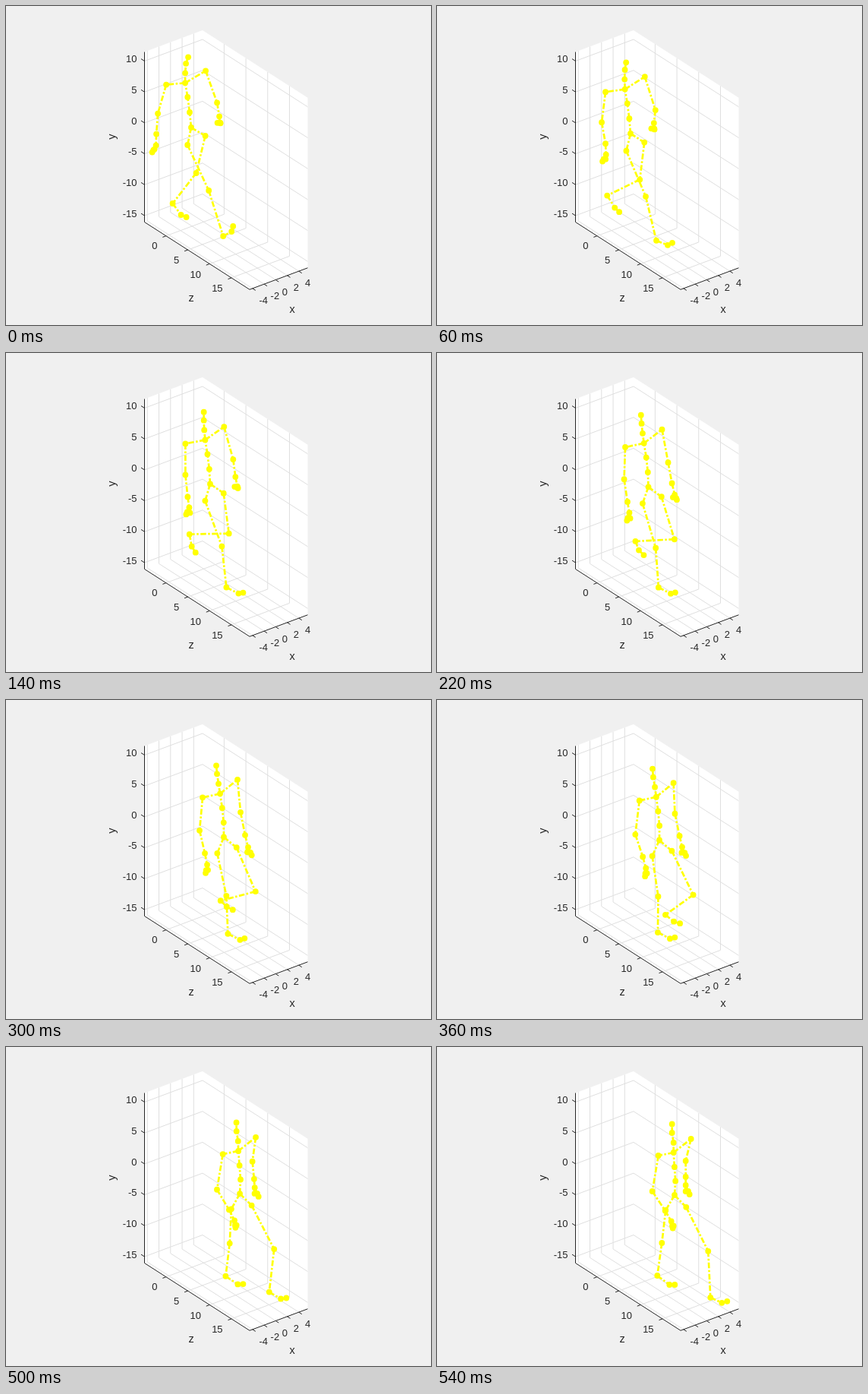
An HTML page that plays this animation: 560 px wide and 420 px high, repeating every 0.56 s.

```html
<!DOCTYPE html>
<html lang="en">
<head>
<meta charset="utf-8">
<title>Walking skeleton</title>
<style>
  html, body { margin: 0; width: 100%; height: 100%; overflow: hidden; background: #f0f0f0; }
  svg { display: block; }
  text { font: 13px "Liberation Sans", Arial, sans-serif; fill: #262626; }
  .name { font-size: 14.5px; text-anchor: middle; }
  .grid { stroke: #dfdfdf; fill: none; }
  .axis { stroke: #262626; fill: none; }
  .bone { stroke: #ff0; stroke-width: 2.7; stroke-dasharray: 7.5 2.5 2.5 2.5; }
  .joint { fill: #ff0; }
</style>
</head>
<body>
<svg id="stage" width="560" height="420" viewBox="0 0 560 420"></svg>
<script>
const stage = document.getElementById('stage');

function add(tag, attrs, text) {
  const el = document.createElementNS('http://www.w3.org/2000/svg', tag);
  for (const key in attrs) el.setAttribute(key, attrs[key]);
  if (text !== undefined) el.textContent = text;
  return stage.appendChild(el);
}

// Oblique box: u runs along x, v along z, h along y (all in pixels)
const U = 76.5, V = 138.5, H = 224;
const project = (u, v, h) => [182.5 + u + v, 284.5 - u * 0.3725 + v * 0.641 - h];
const path = (cls, ...points) =>
  add('polyline', { class: cls, points: points.map(p => project(...p)).join(' ') });
const label = (x, y, text, anchor) =>
  add('text', { x, y: y + 4.7, 'text-anchor': anchor }, text);

const outline = [[0, 0, 0], [0, 0, H], [U, 0, H], [U, V, H], [U, V, 0], [0, V, 0]];
path('face', ...outline).setAttribute('fill', '#fff');

for (let i = 0; i < 5; i++) {
  const u = 3.8 + i * 15.25;
  path('grid', [u, 0, H], [u, 0, 0], [u, V, 0]);
  path('axis', [u, V, 0], [u, V + 4, 0]);
  label(333.5 + i * 15.1, 387.3 - i * 5.7, 2 * i - 4, 'start');
}
for (let i = 0; i < 4; i++) {
  const v = 28.4 + i * 28.7;
  path('grid', [0, v, 0], [U, v, 0], [U, v, H]);
  path('axis', [0, v, 0], [-4.5, v, 0]);
  label(199.5 + i * 28.7, 315.5 + i * 18.7, 5 * i, 'end');
}
for (let i = 0; i < 6; i++) {
  const h = 8.5 + i * 40.7;
  path('grid', [0, 0, h], [U, 0, h], [U, V, h]);
  path('axis', [0, 0, h], [-0, -4.5, h]);
  label(172.5, 273 - i * 40.7, 5 * i - 15, 'end');
}
path('axis', [0, 0, H], [0, 0, 0], [0, V, 0], [U, V, 0]);

add('text', { class: 'name', x: 377, y: 404 }, 'x');
add('text', { class: 'name', x: 244, y: 389 }, 'z');
add('text', { class: 'name', transform: 'translate(144 172) rotate(-90)' }, 'y');

// Key times in steps of 20 ms, chosen by the number of poses given
const STEP = 20, STEPS = 28;
const keyTimes = { 2: [0, 27], 3: [0, 15, 27], 4: [0, 7, 15, 27], 6: [0, 3, 7, 15, 22, 27] };

// Smooth curve through the keys (cubic Hermite)
function curve(times, values, t) {
  const last = times.length - 1;
  const slope = k => {
    const a = Math.max(k - 1, 0), b = Math.min(k + 1, last);
    return (values[b] - values[a]) / (times[b] - times[a]);
  };
  let k = 0;
  while (k < last - 1 && t > times[k + 1]) k++;
  const span = times[k + 1] - times[k], s = (t - times[k]) / span, r = 1 - s;
  return values[k] * r * r * (1 + 2 * s) + values[k + 1] * s * s * (3 - 2 * s)
    + span * s * r * (slope(k) * r - slope(k + 1) * s);
}

const joints = [];

// Each joint moves relative to its parent; keys are x, y pairs
function joint(parent, ...keys) {
  const node = {
    parent,
    xs: keys.filter((_, i) => i % 2 === 0),
    ys: keys.filter((_, i) => i % 2 === 1),
    line: parent && add('line', { class: 'bone' }),
    dot: add('circle', { class: 'joint', r: 3.9 })
  };
  joints.push(node);
  return node;
}

function hand(wrist, fingers, thumb) {
  const palm = joint(wrist, ...fingers.map(n => n * 0.66));
  joint(palm, ...fingers.map(n => n * 0.34));
  joint(wrist, ...thumb);
}

const root = joint(null, 244, 160, 255, 168, 269, 172.4, 287, 180.5, 301, 190, 313, 195);

const waist = joint(root, -2, -20, 1.2, -18.5);
const chest = joint(waist, -2.7, -20, -1.3, -18.5);
const neck = joint(chest, -3.2, -18.7, -2.8, -18.8, -1.2, -19);
const throat = joint(neck, 0, -13, -2, -13, 0, -13);
const face = joint(throat, 1, -12.5, -2, -13, -2, -13);
joint(face, 3, -8.5, 0, -11, -1, -11, 0, -11.5);

const shoulderL = joint(neck, -25, 2.3, -26, 5, -23, 5, -20, 4);
const elbowL = joint(shoulderL, -11, 38, -5, 40, 0, 41, -4, 43.5, -7, 46, -8, 47);
const forearmL = joint(elbowL, -2, 27, 5, 28, 3, 29, 7, 30, 14, 28, 17, 25.5);
const wristL = joint(forearmL, -0.5, 15, 2, 14, 3, 15, 8, 14);
hand(wristL, [-5, 9, -4, 9, -2, 11, 2, 9], [-2, 5, 1, 7, 1, 7, 3, 6]);

const shoulderR = joint(neck, 27, -16, 23, -18.5, 23, -18);
const elbowR = joint(shoulderR, 15, 42, 14, 44, 12, 43, 4, 43, -1, 36, -7, 29);
const forearmR = joint(elbowR, 3, 18, -2, 17, 3, 23, 6, 30, 5, 26, 0, 21);
const wristR = joint(forearmR, 0.5, 8, 0, 7, 2.5, 12.5, 4, 16, 2, 12, 0, 11);
hand(wristR, [1, 1, 0.8, 2.5, 4.7, 10.5, 5, 12], [-3, 0.5, -3.5, 0.5, -1, 6.5, 0, 8]);

const hipR = joint(root, 18.6, 11, 15.3, 15.8);
const kneeR = joint(hipR, -12, 49, -6, 49, 7, 53, 25, 58, 30, 57, 29, 58);
const ankleR = joint(kneeR, -31, 40, -43, 21, -52, 1, -46, 12, -20, 48, 3, 61);
const footR = joint(ankleR, 11, 15, 10, 16, 3, 16, 8, 8, 15, 11, 15, 7);
joint(footR, 7, 3, 5, 8, 8, 4, 7, -2);

const hipL = joint(root, -4.8, 23, -11.7, 20);
const kneeL = joint(hipL, 28, 60, 22, 60, 12, 56, -5, 43);
const ankleL = joint(kneeL, 19, 60, 14, 58, 6, 54, 2, 50, -4, 44, -6, 43);
const footL = joint(ankleL, 11, -6, 15, 6, 16, 8, 16, 8, 16, 9, 16, 12);
joint(footL, 2, -7, 6, -3, 6, -1, 6, -2, 7, -1, 7, 0);

function set(el, attrs) {
  for (const key in attrs) el.setAttribute(key, attrs[key].toFixed(2));
}

function draw(now) {
  const t = Math.floor(now / STEP) % STEPS;
  for (const node of joints) {
    const { parent, xs, ys } = node, times = keyTimes[xs.length];
    node.x = curve(times, xs, t) + (parent ? parent.x : 0);
    node.y = curve(times, ys, t) + (parent ? parent.y : 0);
    set(node.dot, { cx: node.x, cy: node.y });
    if (parent) set(node.line, { x1: parent.x, y1: parent.y, x2: node.x, y2: node.y });
  }
}

const start = performance.now();
function loop() {
  draw(performance.now() - start);
  requestAnimationFrame(loop);
}
loop();
</script>
</body>
</html>
```
